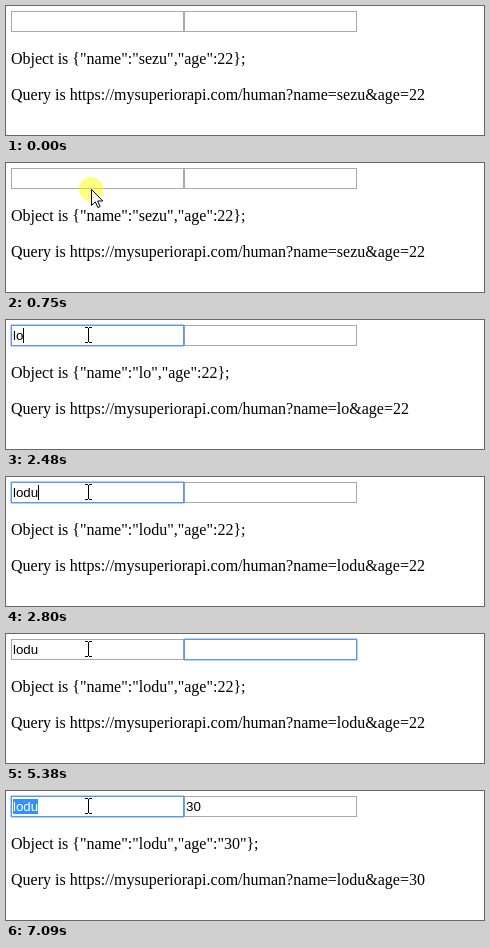
An HTML page that plays this animation: 478 by 129 pixels, repeating every 8 s.

```html
<!DOCTYPE html>
<html lang="en">
<head>
<meta charset="utf-8">
<title>Object to query</title>
<style>
  html, body { margin: 0; width: 100%; height: 100%; overflow: hidden; background: #fff; color: #000; }
  span, svg { position: absolute; white-space: pre; }
  svg { left: 0; top: 0; }
  .serif { left: 5px; font: 16px/18px "Liberation Serif", "Times New Roman", serif; }
  .field { top: 8px; font: 13.3333px/15px "Liberation Sans", Arial, sans-serif; }
  .box { fill: none; stroke: #a9a9a9; }
  #ring { fill: none; stroke: #4d90fe; }
  #ring .outer { opacity: .42; }
  #ring .inner { opacity: .8; }
  #caret, #beam { shape-rendering: crispEdges; }
  #object { top: 44px; }
  #query { top: 80px; }
  #first { left: 7px; }
  #second { left: 180px; }
  #first.selected { color: #fff; background: #3390ff; }
</style>
</head>
<body>
<svg width="478" height="129">
  <rect class="box" x="5.5" y="5.5" width="172" height="20"/>
  <rect class="box" x="178.5" y="5.5" width="172" height="20"/>
  <g id="ring">
    <rect class="outer" x="-.5" y="4.5" width="174" height="22" rx="1.5"/>
    <rect class="inner" x=".5" y="5.5" width="172" height="20"/>
  </g>
</svg>
<span id="first" class="field"></span>
<span id="second" class="field"></span>
<span id="object" class="serif"></span>
<span id="query" class="serif"></span>
<svg width="478" height="129">
  <rect id="caret" y="8" width="1" height="15"/>
  <g id="pointer">
    <circle id="halo" r="12" fill="#ff0" opacity=".5"/>
    <path id="arrow" d="M.5 .5V16.5L4.3 12.9L7 18.5L9.2 17.5L6.6 12H11.8Z" fill="#fff" stroke="#000"/>
    <path id="beam" d="M-3 -7h3v1h1v-1h3v1h-3v14h3v1h-3v-1h-1v1h-3v-1h3v-14h-3z"/>
  </g>
</svg>
<script>
const LOOP = 8000;
const TYPED_NAME = "lodu";
const DEFAULT_NAME = "sezu";
const MOVE = { start: 70, step: 75.6, count: 9, from: [264, 97], to: [85, 26] };
const BOX_X = [5, 178];
const PADDING = 2;

// Each entry lists only what changes at that time.
const timeline = [
  [0, { letters: 0, age: "", focus: -1, caret: false, selected: false, pointer: "", halo: false }],
  [70, { pointer: "arrow", halo: true }],
  [990, { pointer: "beam" }],
  [1070, { focus: 0, caret: true }],
  [1150, { halo: false }],
  [1620, { caret: false }],
  [2100, { letters: 1, caret: true }],
  [2480, { letters: 2 }],
  [2650, { letters: 3 }],
  [2800, { letters: 4 }],
  [3350, { caret: false }],
  [3730, { focus: 1, caret: true }],
  [4280, { caret: false }],
  [4830, { caret: true }],
  [5380, { caret: false }],
  [5530, { age: "3", caret: true }],
  [5680, { age: "30" }],
  [6160, { caret: false }],
  [6690, { caret: true }],
  [6940, { focus: 0, halo: true }],
  [7020, { selected: true, caret: false }],
  [7090, { halo: false }]
];

const el = id => document.getElementById(id);
const show = (id, on) => el(id).setAttribute("visibility", on ? "visible" : "hidden");
const move = (id, x, y) => el(id).setAttribute("transform", `translate(${x} ${y})`);
const setText = (id, value) => {
  if (el(id).textContent !== value) el(id).textContent = value;
};

function stateAt(time) {
  return Object.assign({}, ...timeline.filter(([start]) => start <= time).map(([, change]) => change));
}

function pointerPosition(time, kind) {
  if (kind === "beam") return [82, 14];
  const step = Math.floor((time - MOVE.start) / MOVE.step);
  const progress = Math.max(0, Math.min(1, step / MOVE.count));
  const eased = progress * progress * (3 - 2 * progress);
  return MOVE.from.map((from, i) => Math.round(from + (MOVE.to[i] - from) * eased));
}

function draw(time) {
  const s = stateAt(time);
  const value = TYPED_NAME.slice(0, s.letters);
  const name = value || DEFAULT_NAME;

  setText("first", value);
  setText("second", s.age);
  setText("object", `Object is {"name":"${name}","age":${s.age ? `"${s.age}"` : 22}};`);
  setText("query", `Query is https://mysuperiorapi.com/human?name=${name}&age=${s.age || 22}`);
  el("first").classList.toggle("selected", s.selected);

  show("ring", s.focus >= 0);
  show("caret", s.caret);
  if (s.focus >= 0) {
    const x = BOX_X[s.focus];
    const { width } = el(s.focus ? "second" : "first").getBoundingClientRect();
    move("ring", x, 0);
    move("caret", Math.round(x + PADDING + width), 0);
  }

  show("halo", s.halo);
  show("arrow", s.pointer === "arrow");
  show("beam", s.pointer === "beam");
  move("pointer", ...pointerPosition(time, s.pointer));
}

const origin = performance.now();
function tick() {
  draw((performance.now() - origin) % LOOP);
  requestAnimationFrame(tick);
}
tick();
</script>
</body>
</html>
```
